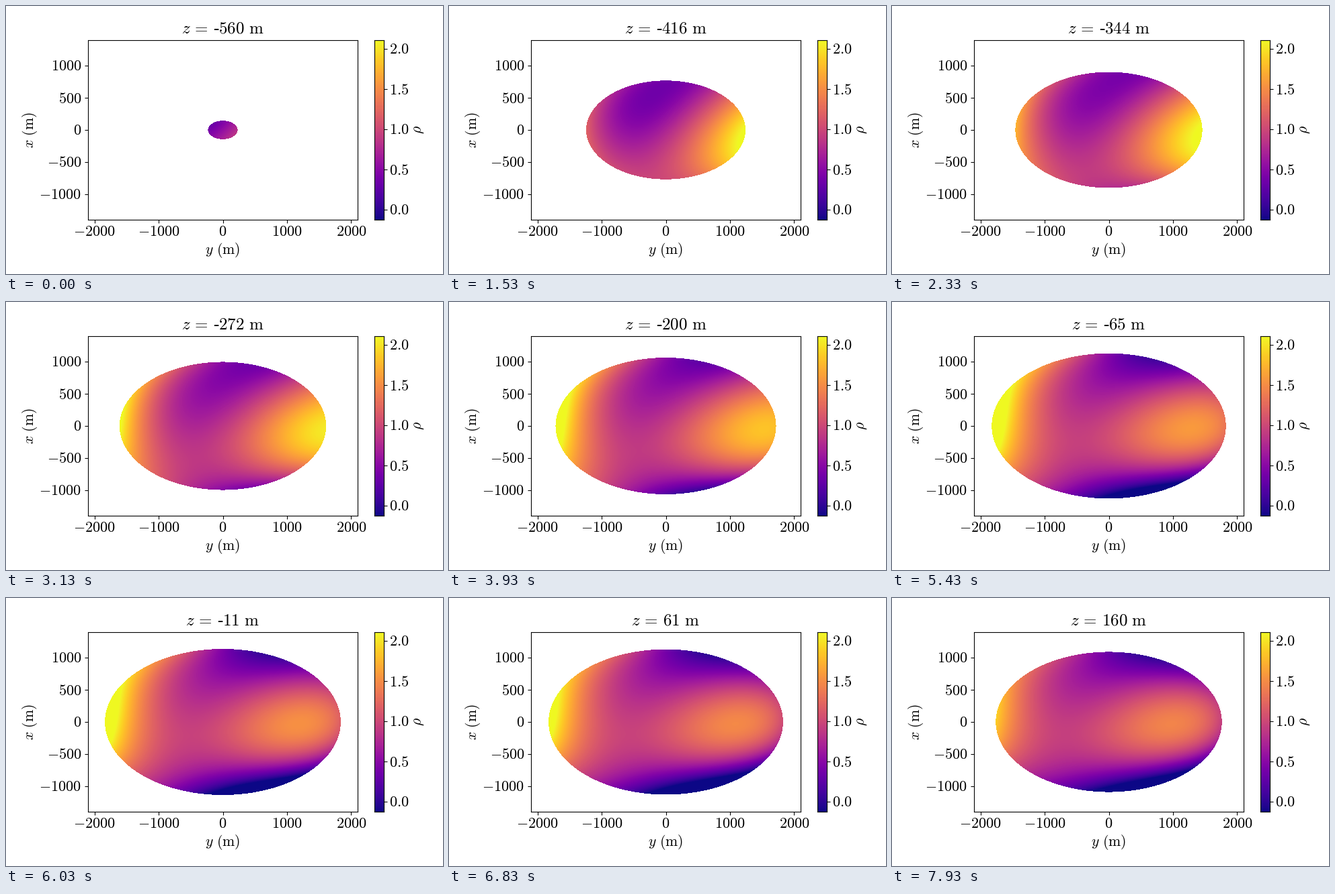
Recreate the animation shown at these times as a matplotlib script. Size 650 px wide and 400 px high, loop 8000 ms.

```python
import numpy as np
import matplotlib as mpl
import matplotlib.pyplot as plt
from matplotlib.animation import FuncAnimation

W, H, DPI = 650, 400, 100
INTERVAL, FRAMES = 20, 400
VMIN, VMAX = -0.125, 2.1125
SEMI_Y, SEMI_X, SEMI_Z = 1.837, 1.139, 0.5645  # ellipsoid semi-axes, km

mpl.rcParams.update({
    "mathtext.fontset": "cm",
    "font.family": "Liberation Serif",
    "font.size": 16,
})

fig = plt.figure(figsize=(W / DPI, H / DPI), dpi=DPI, facecolor="white")


def add_axes(left, top, width, height):
    return fig.add_axes([left / W, 1 - (top + height) / H, width / W, height / H])


def label(x, y, text, **style):
    style = {"ha": "center", "va": "center", "size": 15.7, **style}
    return fig.text(x / W, 1 - y / H, text, **style)


def density(y, x, z):
    """Smooth density inside the body; coordinates in km."""
    along_y = (1.045 + 0.42 * z - 0.8 * z**2
               + (0.42 - 0.045 * z + 1.77 * z**2) * y
               + (0.278 - 0.85 * z) * y**2
               - 0.236 * y**3 - 0.013 * y**4)
    tilt = (-0.34 + 0.32 * z - 1.6 * z**2
            + (-0.08 + 0.4 * z) * y + 0.22 * y**2)
    bend = (-0.95 - 1.17 * z + 1.86 * z**2
            - 1.12 * y - 0.12 * y**2 + 0.21 * y**3)
    return (along_y + tilt * x + bend * x**2
            + (0.55 + 0.08 * y) * x**3 + 0.12 * x**4)


def section(z):
    """RGBA picture of the slice at height z, transparent outside the body."""
    rgba = cmap(norm(density(Y, X, z)), bytes=True)
    inside = (Y / SEMI_Y)**2 + (X / SEMI_X)**2 + (z / SEMI_Z)**2 <= 1
    rgba[..., 3] = 255 * inside
    return rgba


cmap = mpl.colormaps["plasma"]
norm = mpl.colors.Normalize(VMIN, VMAX)
Y, X = np.meshgrid((np.arange(401) - 200) * 4.2 / 401,
                   (np.arange(268) - 133.5) * 2.8 / 268)

ax = add_axes(122, 51, 401, 268)
image = ax.imshow(section(-0.56), extent=(-2100, 2100, -1400, 1400),
                  origin="lower", aspect="auto", interpolation="nearest")
ax.set_xticks(range(-2000, 2001, 1000))
ax.set_yticks(range(-1000, 1001, 500))
ax.xaxis.set_major_formatter("${x:.0f}$")
ax.yaxis.set_major_formatter("${x:.0f}$")
ax.tick_params(axis="x", pad=3.9)

cax = add_axes(548, 51, 14, 268)
cax.imshow(np.linspace(0, 1, 256)[:, None], cmap=cmap, origin="lower",
           extent=(0, 1, VMIN, VMAX), aspect="auto", interpolation="nearest")
cax.set_xticks([])
cax.set_yticks(np.arange(0, 2.1, 0.5))
cax.yaxis.tick_right()
cax.yaxis.set_major_formatter("${x:.1f}$")
cax.tick_params(axis="y", pad=2.6)

label(322, 365, r"$y\ \mathrm{(m)}$")
label(35.5, 185, r"$x\ \mathrm{(m)}$", rotation=90)
label(614.5, 184, r"$\rho$", rotation=90)
title = label(322, 40.7, "", size=18, va="baseline")

shown = None


def update(i):
    global shown
    step = (i + 4) // 5
    if step != shown:
        shown = step
        z = -560 + 9 * step
        sign = "-" if z < 0 else ""
        title.set_text(rf"$z\,=\,${sign}${abs(z)}\ \mathrm{{m}}$")
        image.set_data(section(z / 1000))
    return image, title


anim = FuncAnimation(fig, update, frames=FRAMES, interval=INTERVAL,
                     repeat=True, repeat_delay=0, cache_frame_data=False)
plt.show()
```
